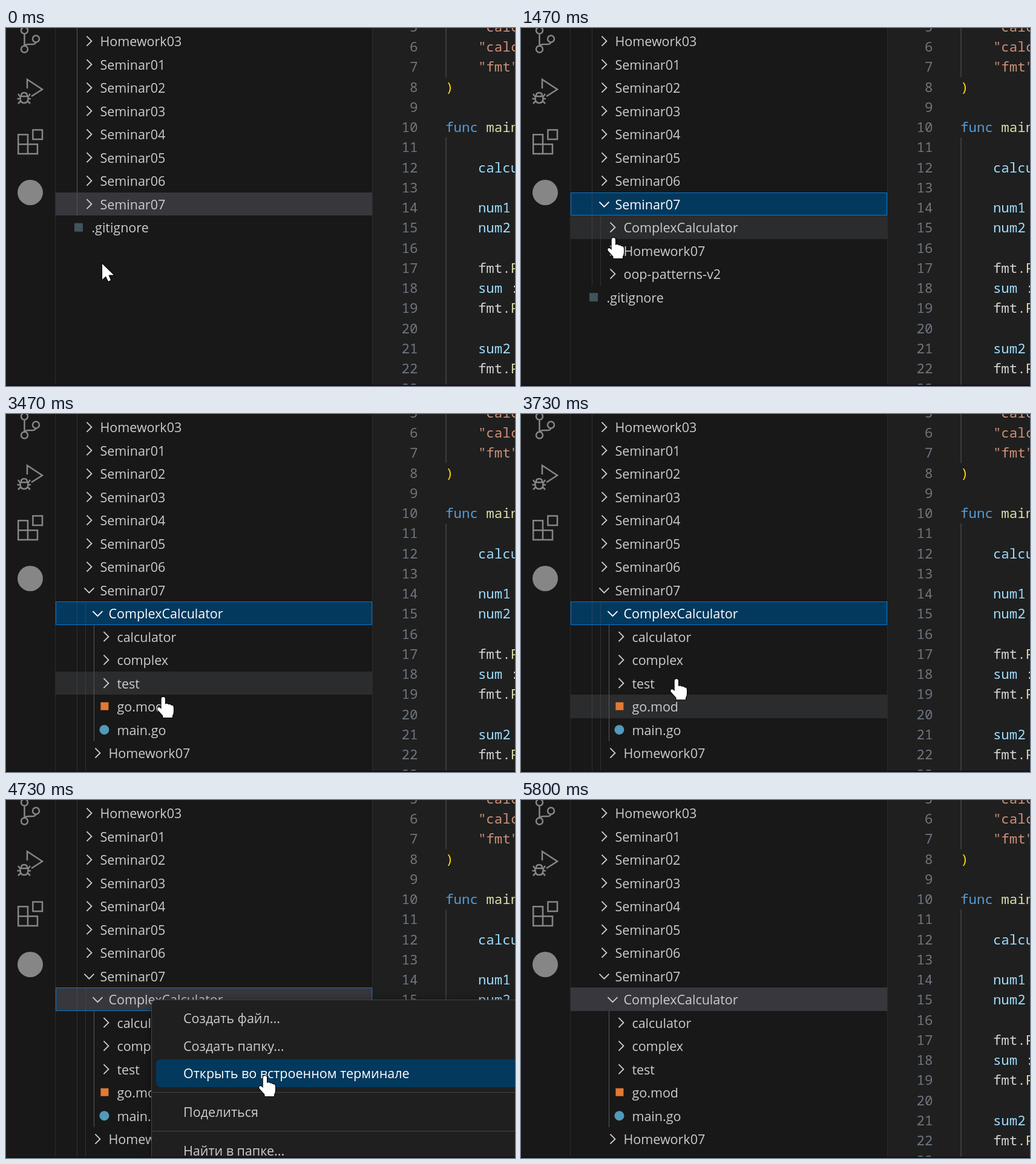
Write an HTML page with a canvas that moves like this. It is 841 by 592 pixels and loops after 6340 ms.

```html
<!DOCTYPE html>
<html lang="ru">
<head>
<meta charset="utf-8">
<style>
html, body { margin: 0; width: 841px; height: 592px; overflow: hidden; background: #181818; }
canvas { display: block; }
</style>
</head>
<body>
<canvas id="stage" width="841" height="592"></canvas>
<script>
const c = document.getElementById('stage').getContext('2d');
const LOOP = 6340, STEP = 200 / 3, ROW = 38.5;
const UI = '21.5px "Open Sans", "Noto Sans", sans-serif';
const MONO = '22.45px "Noto Sans Mono", "DejaVu Sans Mono", monospace';
const GREY = '#868686', TEXT = '#cccccc', BLUE = '#04395e';
const GUIDE = 'rgba(88,88,88,.4)', ACTIVE_GUIDE = '#585858';

// Pointer path: time, x, y
const path = [
  [0, 159, 390], [333, 152, 284], [667, 152, 284], [1067, 152, 322],
  [1200, 152, 322], [1467, 153, 347], [1667, 153, 386], [1867, 153, 366],
  [2267, 153, 366], [2600, 154, 342], [3067, 154, 342], [3467, 260, 468],
  [3600, 264, 492], [4000, 243, 331], [4200, 243, 331], [4267, 258, 345],
  [4733, 428, 456], [5333, 428, 456], [5800, 470, 670], [LOOP, 470, 670]
];

// Code lines: number -> pieces of [column, text, colour]
const VAR = '#9cdcfe', STR = '#ce9178', PLAIN = '#d4d4d4', FN = '#dcdcaa';
const print = [[4, 'fmt.', PLAIN], [8, 'Println', FN]];
const code = {
  5: [[4, '"calculator"', STR]], 6: [[4, '"calculator"', STR]], 7: [[4, '"fmt"', STR]],
  8: [[0, ')', '#ffd700']],
  10: [[0, 'func', '#569cd6'], [5, 'main', FN]],
  12: [[4, 'calculator', VAR]], 14: [[4, 'num1', VAR]], 15: [[4, 'num2', VAR]],
  17: print, 18: [[4, 'sum', VAR], [8, ':=', PLAIN]], 19: print,
  21: [[4, 'sum2', VAR]], 22: print
};

const arrow = new Path2D('M0 0V26L6 20.5L10 29L14 27L10.5 18.5H19Z');
const hand = new Path2D('M-3.3 3Q-3.3 0 0 0Q3 0 3 3V12Q6 10 8.5 12.5Q11.5 11.5 13 14Q17 13.5 17 18V24Q17 28 15 31V34H-.5V31L-9 21.5Q-11 18 -8 17Q-6 16.5 -3.3 20Z');
const sourceControl = new Path2D('M36 4A5.5 5.5 0 1 1 25 4A5.5 5.5 0 1 1 36 4M36 35A5.5 5.5 0 1 1 25 35A5.5 5.5 0 1 1 36 35M55 18A5.5 5.5 0 1 1 44 18A5.5 5.5 0 1 1 55 18M30.5 10V29M49.5 24Q48 27 43 27H37Q32 27 30.5 30');
const debug = new Path2D('M35 100V85L60 101.5L42 113M36.5 116Q36.5 124 30 124Q23.5 124 23.5 116V113H36.5ZM25 112Q25 107 30 107Q35 107 35 112M23 113L20 109M37 113L40 109M23 117H18.5M37 117H41M24 121L20 125M36 121L40 125');
const extensions = new Path2D('M20.2 176.2H36V208H20.2ZM20.2 192.2H52V208H36M44.4 168.4H60V184H44.4Z');

function rect(x, y, w, h, color) {
  c.fillStyle = color;
  c.fillRect(x, y, w, h);
}

function dot(x, y, r, color) {
  c.fillStyle = color;
  c.beginPath();
  c.arc(x, y, r, 0, 7);
  c.fill();
}

function label(text, x, y, color = TEXT, font = UI) {
  c.font = font;
  c.fillStyle = color;
  c.fillText(text, x, y);
}

function stroke(shape, color, width) {
  c.strokeStyle = color;
  c.lineWidth = width;
  c.stroke(shape);
}

function pointer(t) {
  const i = Math.max(1, path.findIndex(k => k[0] >= t));
  const [t0, x0, y0] = path[i - 1], [t1, x1, y1] = path[i];
  const p = Math.max(0, (t - t0) / (t1 - t0));
  return [x0 + (x1 - x0) * p, y0 + (y1 - y0) * p];
}

const rowTop = i => Math.floor(2.7 + ROW * i);

function activityBar() {
  for (const icon of [sourceControl, debug, extensions]) stroke(icon, GREY, 2.5);
  dot(40, 272, 21, GREY);
  rect(81, 0, 1, 592, '#2b2b2b');
}

function editor() {
  rect(605, 0, 236, 592, '#1f1f1f');
  rect(605, 0, 1, 592, '#2b2b2b');
  rect(726, 0, 2, 81, '#3c3c3c');
  rect(726, 181, 2, 411, '#3c3c3c');
  for (let n = 5; n <= 23; n++) {
    const y = 105.6 + 33.25 * (n - 8);
    c.textAlign = 'right';
    label(n, 680.5, y, '#6e7681', MONO);
    c.textAlign = 'left';
    for (const [col, text, color] of code[n] || []) label(text, 726 + col * 13.47, y, color, MONO);
  }
}

// Rows: [level, name, open or icon]
function treeRows(open, deep) {
  const rows = ['Homework03', 'Seminar01', 'Seminar02', 'Seminar03', 'Seminar04', 'Seminar05', 'Seminar06']
    .map(name => [1, name]);
  rows.push([1, 'Seminar07', open && 'open']);
  if (open) {
    rows.push([2, 'ComplexCalculator', deep && 'open']);
    if (deep) {
      rows.push([3, 'calculator'], [3, 'complex'], [3, 'test'], [3, 'go.mod', 'mod'], [3, 'main.go', 'go']);
    }
    rows.push([2, 'Homework07'], [2, 'oop-patterns-v2']);
  }
  rows.push([0, '.gitignore', 'git']);
  return rows;
}

function rowIcon(kind, x, y, color) {
  if (kind === 'git') return rect(x - 7, y - 7, 14, 14, '#41535b');
  if (kind === 'mod') return rect(x - 6, y - 7, 13, 13, '#e37933');
  if (kind === 'go') return dot(x, y, 8, '#519aba');
  const shape = kind
    ? `M${x - 8} ${y - 3.5}L${x} ${y + 4.5}L${x + 8} ${y - 3.5}`
    : `M${x - 4} ${y - 8}L${x + 4} ${y}L${x - 4} ${y + 8}`;
  stroke(new Path2D(shape), color, 1.9);
}

function guides(t, open, deep) {
  const end = rowTop(deep ? 16 : 11);
  if (!open) return rect(117, 0, 1, rowTop(8), ACTIVE_GUIDE);
  // Inactive guides show only while the tree is hovered
  const hovered = pointer(t)[1] < 592 && (t < 5060 || t >= 5390);
  if (hovered) {
    rect(117, 0, 1, end, GUIDE);
    rect(131, rowTop(8), 1, end - rowTop(8), GUIDE);
  }
  if (deep) rect(145, rowTop(9), 1, rowTop(14) - rowTop(9), ACTIVE_GUIDE);
}

function tree(t, menuOpen) {
  const open = t >= 660, deep = t >= 2860;
  const rows = treeRows(open, deep);
  const selected = t >= 2790 ? 8 : 7;
  const focused = t >= 525 && t < 4060;
  const hoverY = pointer(Math.max(0, t - STEP))[1];
  const hover = menuOpen ? -1 : Math.floor((hoverY - 2.7) / ROW);

  rows.forEach((row, i) => {
    const y = rowTop(i), h = rowTop(i + 1) - y;
    if (i === selected) {
      rect(82, y, 523, h, focused ? BLUE : '#37373d');
      if (t >= 525 && t < 5065) {
        c.strokeStyle = '#0078d4';
        c.lineWidth = 1;
        c.strokeRect(82.5, y + .5, 522, h - 1);
      }
    } else if (i === hover) rect(82, y, 523, h, '#2b2c2e');
  });

  guides(t, open, deep);

  rows.forEach(([level, name, kind], i) => {
    const y = 2.7 + ROW * i;
    const color = i === selected && focused ? '#ffffff' : TEXT;
    const isFile = kind === 'mod' || kind === 'go';
    rowIcon(kind, level ? 123.4 + 14 * level - (isFile ? 3 : 0) : 120, y + 19, color);
    label(name, 141.4 + 14 * level, y + 27.4, color);
  });
}

function menu(y) {
  c.save();
  c.shadowColor = 'rgba(0,0,0,.36)';
  c.shadowBlur = 14;
  c.fillStyle = '#1f1f1f';
  c.beginPath();
  c.roundRect(240.5, 330.5, 640, 300, 8);
  c.fill();
  c.restore();
  c.strokeStyle = '#454545';
  c.lineWidth = 1;
  c.stroke();
  const active = Math.floor((y - 338) / 45.6);
  if (active >= 0) {
    c.fillStyle = BLUE;
    c.beginPath();
    c.roundRect(248, Math.round(338 + active * 45.6), 620, 46, 8);
    c.fill();
  }
  const items = [['Создать файл...', 361], ['Создать папку...', 407], ['Открыть во встроенном терминале', 452],
    ['Поделиться', 516], ['Найти в папке...', 580]];
  items.forEach(([text, mid], i) => label(text, 293, mid + 8, i === active ? '#ffffff' : TEXT));
  rect(241, 483, 600, 1, '#454545');
  rect(241, 547, 600, 1, '#454545');
}

function cursor(t, x, y) {
  const isArrow = t < 190 || (t >= 4060 && t < 4320);
  const shape = isArrow ? arrow : hand;
  c.save();
  c.translate(x, y);
  c.lineJoin = 'round';
  stroke(shape, '#000000', 2);
  c.fillStyle = '#ffffff';
  c.fill(shape);
  c.restore();
}

function draw(now) {
  const t = Math.floor((now % LOOP + 4) / STEP) * STEP;
  const [x, y] = pointer(t);
  const menuOpen = t >= 4190 && t < 5060;
  rect(0, 0, 841, 592, '#181818');
  activityBar();
  tree(t, menuOpen);
  editor();
  if (menuOpen) menu(y);
  rect(0, 590, 841, 2, '#150e14');
  cursor(t, x, y);
}

const start = performance.now();
function tick() {
  draw(performance.now() - start);
  requestAnimationFrame(tick);
}
tick();
</script>
</body>
</html>
```
